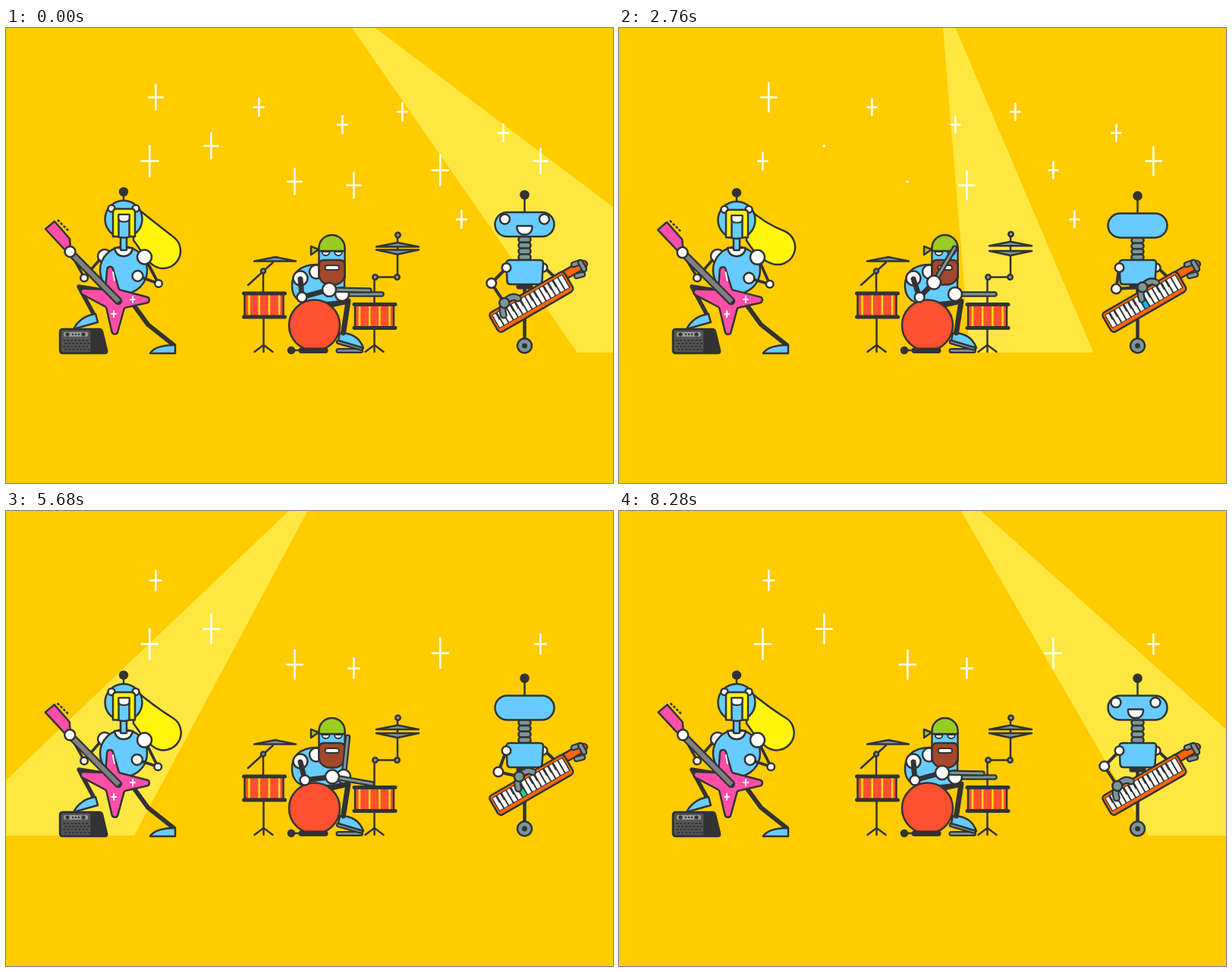
An HTML page with a canvas for the animation above (8.32 s loop, 800x600 px).

```html
<!DOCTYPE html>
<html lang="en">
<head>
<meta charset="utf-8">
<title>Robot band</title>
<style>
html, body { margin: 0; width: 100%; height: 100%; overflow: hidden; background: #fc0; }
canvas { display: block; width: 800px; height: 600px; }
</style>
</head>
<body>
<canvas id="stage" width="800" height="600"></canvas>
<script>
const c = document.getElementById('stage').getContext('2d');
const LOOP = 8320, BEAT = 520, BAR = 2080;
const INK = '#333', BLUE = '#6cf', WHITE = '#fff', GRAY = '#7b9699', RED = '#ff5030',
  YELLOW = '#fff50a', STRIPE = '#ffd91a', PINK = '#ff4fa8', ORANGE = '#ff6608';

// ---- timing helpers
const clamp = k => Math.min(1, Math.max(0, k));
const ease = k => k * k * (3 - 2 * k);
const mix = (a, b, k) => a + (b - a) * k;
const mixPt = (p, q, k) => [mix(p[0], q[0], k), mix(p[1], q[1], k)];
// rises to 1 after a, falls back to 0 after b
const gate = (t, a, b, ramp) => ease(clamp((t - a) / ramp)) - ease(clamp((t - b) / ramp));

// ---- drawing helpers
function paint(fill, line = 2.5) {
  if (fill) { c.fillStyle = fill; c.fill(); }
  if (line) { c.strokeStyle = INK; c.lineWidth = line; c.stroke(); }
}
function dot(x, y, r, fill = WHITE, line = 2.5) {
  c.beginPath(); c.arc(x, y, r, 0, 7); paint(fill, line);
}
function box(x, y, w, h, r, fill, line = 2.5) {
  c.beginPath(); c.roundRect(x, y, w, h, r); paint(fill, line);
}
function shape(d, fill, line = 2.5) {
  const p = new Path2D(d);
  if (fill) { c.fillStyle = fill; c.fill(p); }
  if (line) { c.strokeStyle = INK; c.lineWidth = line; c.stroke(p); }
}
function line(pts, w = 2.5, color = INK) {
  c.beginPath();
  pts.forEach(p => c.lineTo(...p));
  c.strokeStyle = color; c.lineWidth = w; c.stroke();
}
function rod(pts, w) { line(pts, w + 4.5); line(pts, w, GRAY); }
function finger(a, b, d) {
  for (const [w, color] of [[10, INK], [5.5, GRAY]]) {
    c.beginPath(); c.moveTo(...a); c.quadraticCurveTo(...b, ...d);
    c.strokeStyle = color; c.lineWidth = w; c.stroke();
  }
}
function plus(x, y, h, w, lw) {
  line([[x, y - h], [x, y + h]], lw, WHITE);
  line([[x - w, y], [x + w, y]], lw, WHITE);
}
function roundPoly(pts, radii, fill) {
  const n = pts.length;
  c.beginPath();
  c.moveTo(...mixPt(pts[n - 1], pts[0], 0.5));
  pts.forEach((p, i) => c.arcTo(...p, ...mixPt(p, pts[(i + 1) % n], 0.5), radii[i % radii.length]));
  c.closePath(); paint(fill);
}
function at(x, y, deg, draw) {
  c.save(); c.translate(x, y); c.rotate(deg * Math.PI / 180); draw(); c.restore();
}

// ---- backdrop
function beam(t) {
  const swing = Math.abs((t + BAR - 232) % BAR / (BAR / 2) - 1);
  const mid = mix(-53.2, 58, ease(swing));
  const foot = deg => 423 + 476 * Math.tan(deg * Math.PI / 180);
  c.beginPath();
  c.moveTo(423, -48);
  c.lineTo(foot(mid - 9.15), 428);
  c.lineTo(foot(mid + 9.15), 428);
  paint('#ffe741', 0);
}

const twinkle = shift => x => 21 * Math.abs(Math.sin(Math.PI * (x + shift)));
const fade = x => 12.5 * (1 - (x / 0.9) ** 2.5);
const STARS = [
  [twinkle(0.31), [197, 91], [458, 207], [704, 175]],
  [twinkle(0.5), [189, 175], [572, 187]],
  [twinkle(0.68), [270, 155], [380, 202]],
  [fade, [333, 104], [443, 127], [522, 110], [655, 138], [600, 252]]
];
function stars(x) {
  for (const [size, ...spots] of STARS) {
    const h = size(x);
    if (h > 0) for (const [sx, sy] of spots) plus(sx + 0.4, sy + 0.4, Math.max(0.1, h - 0.8), h * 0.52, 2.5);
  }
}

// ---- guitarist
function amp(p) {
  shape('M75 397H123Q126 397 127 400L133 425Q134 429 130 429H75Q71 429 71 425V401Q71 397 75 397Z', INK);
  box(72, 398, 40, 30, 3, '#555', 1.5);
  box(76, 401, 32, 6, 2, '#999', 0);
  for (const x of [81, 102]) dot(x, 404, 2.6, INK, 0);
  for (const x of [88, 92, 96]) dot(x, 404, 1.2, INK, 0);
  for (let r = 0; r < 4; r++)
    for (let i = 0; i < 7; i++) {
      const x = 76 + i * 5 + r % 2 * 2, y = 412 + r * 4;
      line([[x, y], [x + 1.5, y]], 2);
    }
  if (p >= 280 && p < 440)
    for (const side of [-1, 0, 1])
      line([[side ? 57 : 50, 411 + 14.5 * side], [side ? 59 : 53, 411 + 12.5 * side]], 2.3, WHITE);
}
function hair(u) {
  const d = mix(37, 0, u) * Math.PI / 180, R = 23;
  const [x, y] = mixPt([207, 294], [213, 280], u);
  c.beginPath();
  c.moveTo(168, mix(234, 240, u));
  c.bezierCurveTo(...mixPt([182, 245], [180, 254], u), ...mixPt([203, 262], [188, 257], u),
    x + Math.sin(d) * R, y - Math.cos(d) * R);
  c.arc(x, y, R, d - Math.PI / 2, d + Math.PI / 2);
  c.bezierCurveTo(...mixPt([182, 304], [190, 303], u), ...mixPt([180, 295], [178, 303], u), 168, 280);
  c.closePath(); paint(YELLOW);
}
function guitar(u) {
  at(143, 358 + 0.8 * u, -1.5 * u, () => {
    c.translate(-143, -358);
    roundPoly([[85, 343], [131, 345], [135, 297], [149, 345], [202, 359], [156, 369], [143, 416], [132, 368]],
      [4, 3], PINK);
    line([[141, 322], [143, 333]], 2, WHITE);
    plus(167, 358, 4, 3, 2);
    plus(142, 377, 4, 3, 2);
    line([[87, 298], [148, 360]], 10.5);
    c.lineCap = 'butt';
    line([[86, 297], [148.5, 360.5]], 6, '#808080');
    c.setLineDash([3.5, 2]);
    line([[68, 253], [82, 267]], 2.5);
    c.setLineDash([]);
    c.lineCap = 'round';
    shape('M52 265L64 255L84 278L85 290L77 292Z', PINK);
  });
}
function guitarist(p, u) {
  const dy = 3.5 * u;
  amp(p);
  hair(u);
  line([[140, 348], [96, 341], [117, 380]], 5.5);
  shape('M89 397Q98 380 118 377L121 388Z', BLUE);
  line([[163, 358], [187, 391], [221, 418]], 6);
  shape('M190 429Q197 418 223 418V429Z', BLUE);
  dot(130, 301, 9);
  dot(155, 319.5, 31, BLUE);
  shape('M143 290Q145 301 155 301Q165 301 167 290Z', WHITE);
  box(151, 274 + dy, 8, 19 - dy, 1, BLUE);
  const palm = mixPt([84.5, 295], [82, 298], u);
  line([[123, 306], [103, 329], palm], 3.5);
  dot(103, 329.5, 4.8);
  guitar(u);
  dot(...palm, 7);
  const elbow = mixPt([201, 337], [194.5, 339], u), hand = mixPt([173.5, 327], [167.5, 335], u);
  line([[183, 303], elbow, hand], 3.8);
  dot(182.5, 302 + u, 9.5);
  dot(...elbow, 4.8);
  dot(...hand, 7);
  at(0, dy, 0, () => {
    line([[155, 220], [155, 230]]);
    dot(155, 216, 6.2, INK, 0);
    dot(155, 252, 24.5, BLUE);
    for (const x of [139, 171]) dot(x, 238, 4.5);
    shape('M141 275V243Q141 238.5 146 238.5H165Q170 238.5 170 243V275H162.5V246H148.5V275Z', YELLOW);
    shape('M148.5 246H162.5V251Q162.5 255.5 155.5 255.5Q148.5 255.5 148.5 251Z', WHITE, 2);
  });
}

// ---- drummer
function drum(x, y) {
  box(x, y, 51, 31, 0, RED);
  for (let i = 0; i < 4; i++) line([[x + 6 + 13.2 * i, y + 3], [x + 6 + 13.2 * i, y + 28]], 2.6, STRIPE);
  for (const edge of [y, y + 31]) line([[x - 1, edge], [x + 53, edge]], 5);
}
function tripod(x, top) {
  line([[x, top], [x, 427]]);
  line([[x - 12, 427], [x, 418], [x + 12, 427]]);
}
function kit(u) {
  tripod(339.5, 383);
  line([[339, 322], [339, 348]]);
  line([[352, 309], [319, 339]]);
  dot(339, 320.5, 3, GRAY);
  shape('M327 307.5L355 302L382 307.5Z', GRAY);
  drum(314.5, 350);
  tripod(485.5, 328);
  drum(460, 364.5);
  line([[486.5, 328.5], [516, 328.5], [516, 276 - 3 * u]]);
  dot(486.5, 328.5, 3.2, GRAY);
  dot(515.5, 328.5, 3.2, GRAY);
  dot(516.5, 273 - 3 * u, 3.2, GRAY);
  at(516, 288.5 - 3.5 * u, 0, () => shape('M-28 0L0 -5.5L28 0Z', GRAY));
  at(516, 292.5 + 4 * u, 0, () => shape('M-28 0L0 6L28 0Z', GRAY));
}
function stick([x, y], deg, len) {
  const a = deg * Math.PI / 180;
  rod([[x, y], [x + len * Math.cos(a), y + len * Math.sin(a)]], 3);
}
function drumHead() {
  shape('M412 292L402 288V299Z', '#9c2');
  box(412.5, 290, 34, 40, 0, BLUE);
  shape('M412.5 294V290A17 17 0 0 1 446.5 290V294Z', '#9c2');
  for (const x of [421.5, 438]) shape(`M${x - 5} 295A5 5 0 0 0 ${x + 5} 295Z`, WHITE, 2);
  box(412.5, 306, 34, 32.5, [6, 6, 14, 14], '#a4482b');
  box(420.5, 313, 18.5, 6, 3, WHITE, 2);
}
function bassDrum(kick) {
  dot(406.5, 392, 33.5, RED);
  box(386.5, 422.5, 37, 5.5, 3, INK, 2);
  const ball = mixPt([376, 425], [405, 404], kick);
  line([ball, [mix(392, 404, kick), 425]]);
  dot(...ball, 5.3, INK, 0);
  if (kick > 0.9)
    for (let i = 0; i < 5; i++)
      at(405, 404, -90 + 72 * i, () => line([[13, 0], [16, 0]], 2.4, STRIPE));
}
function foot(kick) {
  rod([[438, 425.5], [467.5, 425.5]], 2.5);
  if (kick < 0.6) rod([[438, 414], [468, 422.5]], 2);
  const y = 402 + 4 * kick;
  shape(`M440 ${y}Q464 ${y} 471 ${422 - kick}L438 ${412 + 9 * kick}Z`, BLUE);
}
function drummer(t, p, u) {
  const bar = t % BAR;
  const kick = gate(p, 230, 400, 60);
  const left = gate(bar, 300, 620, 140), right = gate(bar, 1300, 1620, 140);
  kit(u);
  shape('M412 312C386 311 376 325 377 342C378 358 390 364 405 364L446 360V312Z', BLUE);
  dot(409, 321.5, 9);
  foot(kick);
  line([[424, 366], [451, 360], [444.5, 402]], 7);
  const grip = [443 + 2 * right, 351 - right];
  drumHead();
  stick(grip, -84 * right, 52);
  dot(...grip, 9);
  bassDrum(kick);
  const elbow = [390 + 10 * left + 4 * right, 355];
  const hand = [426 - 18 * left + 4 * right, 345 - 15.5 * left + 5.5 * right];
  dot(388, 330, 9.5);
  line([[388, 331], elbow, hand], 7);
  dot(...elbow, 6.5);
  stick(hand, 1 - 99 * left + 9 * right, 53);
  dot(...hand, 9);
}

// ---- keyboardist
const HOME = -32;
const NOTES = [
  { from: 1200, to: 2500, x: 37, key: 14, color: PINK },
  { from: 2500, to: 4000, x: 7, key: 7, color: '#00b4f0' },
  { from: 4000, to: 6180, x: -9, key: 5, color: '#2ccb84' }
];

function keyboard(t) {
  at(692.5, 361.5, -30, () => {
    box(50, -14.5, 37, 11, 4, ORANGE);
    dot(85, -9, 4.5, '#b5532c', 2);
    box(-57, -15, 114, 29.5, 5, ORANGE);
    box(-54, -11.5, 108, 20.5, 1, INK, 0);
    const note = NOTES.find(n => t >= n.from + 200 && t < n.to);
    for (let i = 0; i < 15; i++) {
      const x = -52.8 + i * 7.15;
      box(x, -10.5, 5.2, 18.5, 0, note && note.key === i ? note.color : WHITE, 0);
      if (i % 7 !== 2 && i % 7 !== 6 && i < 14) box(x + 4.2, -11, 4, 10, 0, INK, 0);
    }
  });
  rod([[748, 312], [757, 309]], 4);
  rod([[757, 309], [762, 318]], 4);
  rod([[752, 327], [760, 325]], 4);
}
function keyHead(t, u) {
  const x = 683.5 - 116.5 + 143 * Math.cos(2 * Math.PI * (t - 820) / LOOP);
  at(0, 4 * u, 0, () => {
    line([[683.5, 222], [683.5, 243]]);
    dot(683.5, 220, 6.3, INK, 0);
    box(644.5, 243, 78, 32, 16, BLUE, 0);
    c.save();
    c.clip();
    for (const side of [-26, 26]) dot(x + side, 252, 6.5);
    box(x - 10, 261, 20, 11.5, [1, 1, 9, 9], WHITE);
    c.restore();
    box(644.5, 243, 78, 32, 16, null);
  });
}
function keyboardist(t, u) {
  line([[683.5, 343], [683.5, 410]], 4.5);
  dot(683.5, 419, 9.5, GRAY);
  dot(683.5, 419, 3.5, INK, 0);
  const top = 275 + 4 * u, h = (306 - top) / 4;
  for (let i = 0; i < 4; i++) box(675.5, top + i * h, 16, h, 3.5, GRAY);
  box(673, 337, 21, 7, 2, INK, 1);
  line([[711, 317], [730, 335]], 3.8);
  dot(708, 316, 5.5);
  shape('M664 306H704Q708.5 306 708 311L706.5 334Q706 338 702 338H665Q661 338 660.5 334L659.5 311Q659 306 664 306Z', BLUE);
  keyHead(t, u);
  keyboard(t);
  // the wrist slides along the keys and the elbow follows
  const slide = NOTES.reduce((s, n) => s + (n.x - HOME) * gate(t, n.from, n.to, 200), HOME);
  const x = 684 + slide * 0.85, y = 345.5 - slide * 0.53;
  const ex = 652.5 + slide * 0.4, ey = Math.min(344, 344 + (slide + 16) * 0.47);
  line([[659, 317], [ex, ey], [x, y]], 4);
  dot(659.5, 316, 5.8);
  dot(ex, ey, 6.3);
  finger([x, y], [x + 9, y - 11], [x + 18, y - 6]);
  finger([x, y], [x - 4, y + 8], [x - 1, y + 16]);
  dot(x, y, 6.5, GRAY);
}

// ---- loop
function draw(t) {
  const p = t % BEAT, x = p / BEAT;
  const u = 1.1 * Math.sin(Math.PI * x ** 1.4) ** 2;
  c.fillStyle = '#fc0';
  c.fillRect(0, 0, 800, 600);
  c.lineCap = c.lineJoin = 'round';
  beam(t);
  stars(x);
  guitarist(p, u);
  drummer(t, p, u);
  keyboardist(t, u);
}
const start = performance.now();
function tick() {
  const t = (performance.now() - start) % LOOP;
  draw(Math.floor(t / 40) * 40);
  requestAnimationFrame(tick);
}
tick();
</script>
</body>
</html>
```
